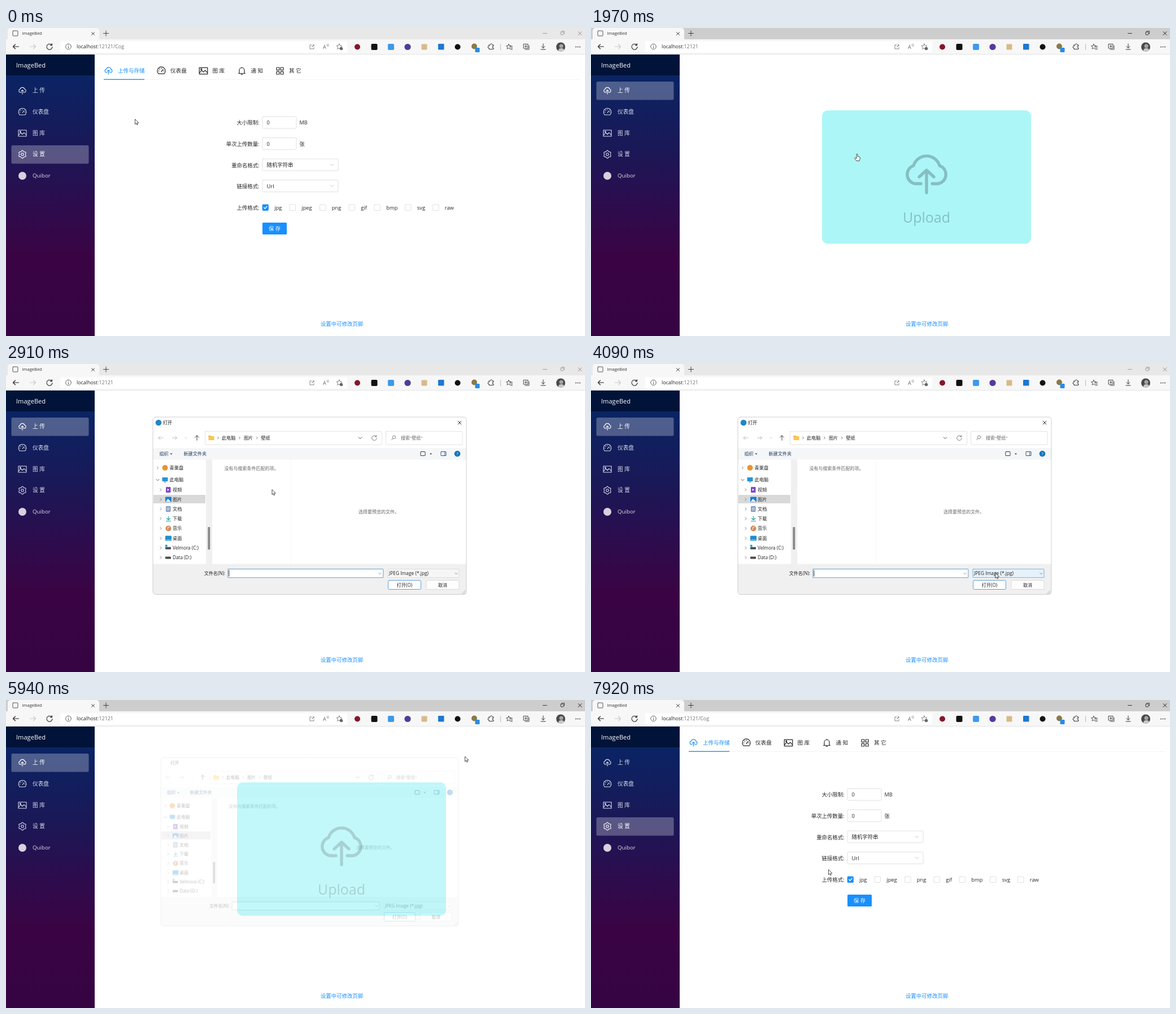
Animation, 1025 px wide and 546 px high, one loop 7990 ms. Source, as an HTML page with a canvas:

```html
<!DOCTYPE html>
<html lang="zh">
<head>
<meta charset="utf-8">
<title>ImageBed</title>
<style>
html, body { margin: 0; width: 100%; height: 100%; overflow: hidden; background: #fff; }
canvas { display: block; width: 1025px; height: 546px; }
</style>
</head>
<body>
<canvas></canvas>
<script>
const W = 1025, H = 546, LOOP = 7990;
const FONT = '"Open Sans", "Noto Sans CJK SC", "Noto Sans CJK", sans-serif';
const BLUE = '#1890ff', INK = '#262626';
const dpr = window.devicePixelRatio || 1;

function setup(canvas) {
  canvas.width = W * dpr;
  canvas.height = H * dpr;
  const ctx = canvas.getContext('2d');
  ctx.scale(dpr, dpr);
  ctx.lineCap = ctx.lineJoin = 'round';
  return ctx;
}
const main = setup(document.querySelector('canvas'));
const layerCanvas = document.createElement('canvas');
const layer = setup(layerCanvas);
let c = main;

// ---- helpers ----
const clamp = v => Math.max(0, Math.min(1, v));
const ramp = (t, from, span) => clamp((t - from) / span);
const smooth = p => p * p * (3 - 2 * p);

function rect(x, y, w, h, fill) {
  c.fillStyle = fill;
  c.fillRect(x, y, w, h);
}
function box(x, y, w, h, r, fill, line, lw = 0.8) {
  c.beginPath();
  c.roundRect(x, y, w, h, r);
  if (fill) { c.fillStyle = fill; c.fill(); }
  if (line) { c.strokeStyle = line; c.lineWidth = lw; c.stroke(); }
}
function disc(x, y, r, fill, line, lw = 1) {
  c.beginPath();
  c.arc(x, y, r, 0, 7);
  if (fill) { c.fillStyle = fill; c.fill(); }
  if (line) { c.strokeStyle = line; c.lineWidth = lw; c.stroke(); }
}
function text(s, x, cy, size, color, align = 'left') {
  c.font = `${size}px ${FONT}`;
  c.textAlign = align;
  c.fillStyle = color;
  c.fillText(s, x, cy + size * 0.36);
}
function icon(d, x, y, line, lw = 1, scale = 1, fill) {
  c.save();
  c.translate(x, y);
  c.scale(scale, scale);
  const p = new Path2D(d);
  if (fill) { c.fillStyle = fill; c.fill(p); }
  if (line) { c.strokeStyle = line; c.lineWidth = lw; c.stroke(p); }
  c.restore();
}

// ---- icon paths, centred on 0,0 ----
const CLOUD = 'M-10 18H-20A16.5 16.5 0 0 1-23-14A24 24 0 0 1 23-14A16.5 16.5 0 0 1 20 18H10M0 34V-5M-13 6L0-6L13 6';
const PICTURE = 'M-7-5.5H7V5.5H-7ZM-7 4L-3-1L0 2L3-1L7 3.5M-4.6-2.8a1 1 0 1 0 2 0a1 1 0 1 0-2 0';
const DASH = 'M-4.6 5A6.8 6.8 0 1 1 4.6 5ZM0 1.2L3.2-2.4M-4.8 0H-3.9M4.8 0H3.9M0-4.8V-3.9M-3.4-3.4L-2.8-2.8';
const BELL = 'M-6 4.5H6M-4.5 4.5V-1A4.5 4.5 0 0 1 4.5-1V4.5M0-5.5V-6.5M-1.5 6.3H1.5';
const GRID = 'M-6-6H-1.3V-1.3H-6ZM1.3-6H6V-1.3H1.3ZM-6 1.3H-1.3V6H-6ZM1.3 1.3H6V6H1.3Z';
const CROSS = 'M-2.6-2.6L2.6 2.6M2.6-2.6L-2.6 2.6';
const DOWN = 'M-2.8-1.3L0 1.5L2.8-1.3';
const RIGHT = 'M-1.2-2.3L1.2 0L-1.2 2.3';
const ARROW_L = 'M5 0H-5M-1-4L-5 0L-1 4';
const ARROW_R = 'M-5 0H5M1-4L5 0L1 4';
const RELOAD = 'M4 -2.8A5 5 0 1 0 5 .6M4.4-5.4V-2.4H1.4';
const STAR = 'M0-5L1.5-1.7L5-1.3L2.4 1L3.1 4.6L0 2.8L-3.1 4.6L-2.4 1L-5-1.3L-1.5-1.7Z';
const TRIANGLE = 'M-2-1H2L0 1.2Z';
const POINTER = 'M0 0V8.6L2 6.8L3.4 9.8L4.7 9.2L3.4 6.3L6 6.1Z';
const HAND = 'M-1 1a1 1 0 0 1 2 0V4.6L4 5.2Q5.3 5.5 5.2 6.8V9L4.2 12.5H-1.2L-4 8.2Q-4.6 7-3.4 6.8L-1 8Z';

function gear(x, y, color) {
  c.beginPath();
  for (let a = 0; a < 6.28; a += 0.1) {
    const r = 6.1 + 0.8 * Math.cos(6 * a);
    c.lineTo(x + r * Math.sin(a), y + r * Math.cos(a));
  }
  c.closePath();
  c.strokeStyle = color;
  c.lineWidth = 1.1;
  c.stroke();
  disc(x, y, 2.2, null, color, 1.1);
}

// ---- cursor ----
const PATH = [
  [0, 228.5, 162], [470, 228.5, 162], [860, 57.5, 105.5], [1330, 57.5, 105.5],
  [1830, 29, 107.5], [1970, 471, 223], [3230, 471, 223], [4020, 716, 371],
  [4760, 716, 371], [5300, 825, 118], [5540, 812.5, 100.5], [6050, 812.5, 100.5],
  [7090, 95.5, 222], [7250, 95.5, 222], [7920, 420.5, 301], [LOOP, 420.5, 301]
];
function cursorAt(t) {
  let i = 1;
  while (PATH[i][0] < t) i++;
  const [t0, x0, y0] = PATH[i - 1], [t1, x1, y1] = PATH[i];
  const p = smooth(ramp(t, t0, t1 - t0));
  return [x0 + (x1 - x0) * p, y0 + (y1 - y0) * p];
}

// ---- browser frame ----
function browser(t) {
  const active = (t >= 70 && t < 2450) || t >= 5840;
  const ctl = active ? '#111' : '#8c8c8c';
  rect(0, 0, W, 21, active ? '#cdcdcd' : '#e8e8e8');
  rect(0, 20, W, 27, '#f7f7f7');
  box(3, 0, 162, 24, [5, 5, 0, 0], '#f7f7f7');
  rect(0, 46, W, 1, '#e2e2e2');

  box(12, 5, 9, 9, 1, null, '#555', 1);
  text('ImageBed', 28.5, 9.5, 7.5, '#333');
  icon(CROSS, 154, 10, '#333', 0.9);
  icon('M-4.5 0H4.5M0-4.5V4.5', 177, 9.5, '#333', 0.9);
  icon('M-3.5 0H3.5', 954, 9.5, ctl, 0.8);
  box(982, 7, 5, 5, 1, null, ctl, 0.8);
  icon('M984 5.5H988.5V10', 0, 0, ctl, 0.7);
  icon(CROSS, 1016, 9.5, ctl, 0.8, 1.15);

  icon(ARROW_L, 17.5, 33, '#222', 1.1);
  icon(ARROW_R, 47.5, 33, '#c8c8c8', 1.1);
  icon(RELOAD, 77, 33, '#222', 1.1);
  box(96, 23.5, 508, 20, 3, '#fff');
  disc(110.5, 33, 4.8, null, '#555', 0.9);
  icon('M0-.5V2.5M0-2.6V-2.4', 110.5, 33, '#555', 0.9);
  text('localhost', 125, 33, 8.9, '#222');
  const port = 125 + c.measureText('localhost').width;
  text(':12121' + (t < 1060 || t >= 7100 ? '/Cog' : ''), port, 33, 8.9, '#707070');

  const g = '#666';
  icon('M-.5-3.5H-3.5V3.5H3.5V1M0 0Q.5-3 4-3M2-5L4-3L2-1', 541.5, 33.5, g, 0.8);
  text('A', 561, 34, 9, g);
  icon('M0-3Q1.5-1.5 0 0M2-4Q4-1.5 2 1', 568, 32, g, 0.7);
  icon(STAR, 590, 33, g, 0.8);
  disc(593.5, 36.5, 2.8, '#666');

  disc(622, 33.5, 5, '#86162b');
  box(646.5, 28, 11, 11, 2, '#111');
  box(676, 28, 11, 11, 2, '#3d9be9');
  disc(711, 33.5, 5.6, '#4f3c9c');
  box(735.5, 28.5, 10, 10, 1, '#d9b98a');
  box(765, 28, 10.5, 10.5, 1, '#1f78d1');
  disc(799.5, 33.5, 5, '#111');
  disc(829, 32.5, 5, '#8a7a48');
  box(830.5, 35, 8, 8, 1, '#2a8be8');

  const k = '#333';
  icon('M-4-3H-1.5a1.6 1.6 0 1 1 3 0H4V-.8a1.5 1.5 0 1 0 0 2.8V4.5H-4V2a1.5 1.5 0 1 1 0-2.8Z', 859, 33, k, 1);
  rect(875, 28, 0.8, 11, '#aaa');
  icon(STAR, 890, 33, k, 0.9, 0.9);
  rect(892, 33, 6, 6, '#f7f7f7');
  icon('M-2-1.6H3M-1 1H3M-1 3.6H3', 893.5, 34, k, 0.9);
  icon('M-5-5H2.5V2.5H-5ZM4.5-2.5V4.5H-2.5M-1.2-3.2V.8M-3.2-1.2H.8', 921.5, 33.5, k, 0.9);
  icon('M0-5V2.5M-3-.5L0 2.5L3-.5M-4 5H4', 951, 33, k, 1);
  c.save();
  c.beginPath();
  c.arc(982, 33.5, 8, 0, 7);
  c.clip();
  rect(974, 25, 16, 17, '#4a484b');
  disc(983, 32, 3.5, '#a9a2a4');
  box(978, 36, 10, 8, 4, '#cac5c7');
  c.restore();
  for (const x of [1009, 1012.5, 1016]) disc(x, 33.5, 0.9, k);
}

// ---- sidebar ----
const MENU = [['上 传', 111], ['仪表盘', 149], ['图 库', 186.5], ['设 置', 224], ['Quibor', 262]];
function sidebar(t, cx, cy) {
  const grad = c.createLinearGradient(0, 84, 0, H);
  [[0, '#0a2464'], [0.3, '#1c1756'], [0.5, '#2d0c4d'], [0.69, '#3a0444'], [1, '#360443']]
    .forEach(([p, col]) => grad.addColorStop(p, col));
  c.fillStyle = grad;
  c.fillRect(0, 47, 157, 499);
  rect(0, 47, 157, 37, '#011338');
  text('ImageBed', 18, 66, 11.1, '#fff');

  const toUpload = ramp(t, 1380, 250) - ramp(t, 7200, 250);
  const selected = [toUpload, 0, 0, 1 - toUpload, 0];
  MENU.forEach(([label, y], i) => {
    const hover = cx > 9 && cx < 147 && Math.abs(cy - y) < 16;
    const a = Math.max(0.27 * selected[i], hover ? 0.12 : 0);
    if (a) box(9.5, y - 16, 137, 32.5, 2.5, `rgba(255,255,255,${a})`);
    const col = hover || selected[i] > 0.5 ? '#fff' : 'rgba(255,255,255,.85)';
    if (i === 0) icon(CLOUD, 29, y, col, 6.2, 0.18);
    if (i === 1) icon(DASH, 29, y, col, 1.1);
    if (i === 2) icon(PICTURE, 29, y, col, 1.1);
    if (i === 3) gear(29, y, col);
    if (i === 4) disc(29, y, 7, '#d6d1de');
    text(label, 47, y, 9.7, col);
  });
}

// ---- pages ----
function settingsPage() {
  rect(173, 91, 843, 0.8, '#efefef');
  rect(173, 90.5, 72, 1.4, BLUE);
  icon(CLOUD, 181.5, 75.7, BLUE, 6.2, 0.185);
  icon(DASH, 275, 76, INK, 1.2, 1.04);
  icon(PICTURE, 349.5, 76, INK, 1.2, 1.04);
  icon(BELL, 417.5, 76, INK, 1.2);
  icon(GRID, 485, 76, INK, 1.2);
  text('上传与存储', 198, 76, 9.5, BLUE);
  [['仪表盘', 291], ['图 库', 365.5], ['通 知', 433.5], ['其 它', 501]]
    .forEach(([s, x]) => text(s, x, 76, 9.6, INK));

  ['大小限制:', '单次上传数量:', '重命名格式:', '链接格式:', '上传格式:']
    .forEach((s, i) => text(s, 448.5, 168 + i * 37.6, 9.4, INK, 'right'));
  [['0', 'MB', 157], ['0', '张', 194.5]].forEach(([v, unit, y]) => {
    box(454, y, 60, 21, 1.5, '#fff', '#d9d9d9');
    text(v, 461.5, y + 11, 9.2, INK);
    text(unit, 519.5, y + 11, 9.2, INK);
  });
  [['随机字符串', 232], ['Url', 269.5]].forEach(([v, y]) => {
    box(454, y, 134, 21, 1.5, '#fff', '#d9d9d9');
    text(v, 461.5, y + 11, 9.4, INK);
    icon(DOWN, 577, y + 10.5, '#bfbfbf', 0.9);
  });
  [['jpg', 454], ['jpeg', 502], ['png', 555.5], ['gif', 607], ['bmp', 652], ['svg', 706.5], ['raw', 755.5]]
    .forEach(([s, x], i) => {
      box(x, 313, 10.5, 10.5, 1.3, i ? '#fff' : BLUE, i ? '#d9d9d9' : BLUE);
      if (!i) icon('M-2.5 0L-.7 2L2.8-2', x + 5.2, 318.2, '#fff', 1.3);
      text(s, x + 21.3, 318.5, 9.3, INK);
    });
  box(454, 345, 43, 21, 1.5, BLUE);
  text('保 存', 475.5, 355.8, 9.4, '#fff', 'center');
}

function uploadPage() {
  box(409, 146, 370, 236.5, 10, '#acf6f8');
  icon(CLOUD, 594, 258, '#86bfc1', 5.3);
  text('Upload', 594, 336, 24.9, '#86bfc1', 'center');
}

function page(t) {
  rect(157, 47, 868, 499, '#fff');
  const upload = t >= 1380 && t < 7200;
  c.globalAlpha = upload ? ramp(t, 1330, 300) : t >= 7200 ? ramp(t, 7150, 300) : 1;
  upload ? uploadPage() : settingsPage();
  c.globalAlpha = 1;
  text('设置中可修改页脚', 594.5, 525, 9.4, BLUE, 'center');
}

// ---- file dialog ----
const TREE = [
  ['青栗盘', 184, '#e8942e'], ['此电脑', 205.5, '#2793d6'], ['视频', 223, '#8048c8'],
  ['图片', 240, '#1680d8'], ['文档', 257, '#8199b8'], ['下载', 274, '#19a39a'],
  ['音乐', 291.5, '#d08a58'], ['桌面', 309, '#1f8ed0'], ['Velmora (C:)', 326, '#4a4a4a'], ['Data (D:)', 343, '#4a4a4a']
];
function treeIcon(i, x, y, col) {
  if (i === 0) disc(x - 8, y, 5, col);
  else if (i === 1) {
    box(x - 13, y - 4.5, 10, 7, 1, col);
    rect(x - 10, y + 3.3, 4, 1, '#567');
  } else if (i === 5) icon('M0-4V2.5M-3-.5L0 2.5L3-.5M-4 4.5H4', x - 7.5, y, col, 1.1);
  else if (i === 6) {
    disc(x - 7.5, y, 5, col);
    icon('M-1 2V-2L2-2.6', x - 7.5, y, '#fff', 1);
  } else if (i > 7) {
    box(x - 13, y - 1.5, 10, 4, 1, col);
    if (i === 8) rect(x - 13, y - 5.5, 3.5, 3.5, '#1d9be0');
  } else {
    const tall = i === 2 || i === 4;
    box(x - (tall ? 12 : 13), y - (tall ? 5 : 4.5), tall ? 8.5 : 11, tall ? 10 : 9, 1, col);
    if (i === 2) icon('M-1.3-2L2 0L-1.3 2Z', x - 8, y, null, 1, 1, '#fff');
    if (i === 3) icon('M-4.5 4L-1-1L4.5 4Z', x - 7.5, y, null, 1, 1, '#fff');
    if (i === 4) icon('M-2.3-2H2.3M-2.3 0H2.3M-2.3 2H2.3', x - 7.8, y, '#fff', 0.8);
    if (i === 7) rect(x - 12, y + 2.5, 9, 1, '#bfe4f7');
  }
}

function dialogBody(t) {
  const grey = '#666', dark = '#222', navy = '#1e395b';
  text('此电脑', 382, 131, 8.1, dark);
  text('图片', 421, 131, 8.1, dark);
  text('壁纸', 451.5, 131, 8.1, dark);
  for (const x of [375.5, 413.5, 444.5]) icon(RIGHT, x, 131, dark, 0.8, 0.8);
  icon(ARROW_L, 274, 131, '#999', 0.8, 0.8);
  icon(ARROW_R, 298.5, 131, '#999', 0.8, 0.8);
  icon(DOWN, 318.5, 131, '#999', 0.8, 0.6);
  icon('M0 5V-5M-4-1L0-5L4-1', 338, 131, dark, 1, 0.85);
  box(358.5, 127, 4.5, 3, 0.8, '#e3a42f');
  box(358.5, 128, 10, 7, 0.8, '#f9c64e');
  icon(DOWN, 627, 131, dark, 0.8);
  icon(RELOAD, 652, 131, '#555', 0.9, 0.85);
  disc(687, 129.8, 2.7, null, grey, 0.8);
  icon('M685 132L682.5 134.5', 0, 0, grey, 0.8);
  text('搜索"壁纸"', 699, 131, 8, grey);

  text('组织', 271.5, 159.5, 8, navy);
  icon(TRIANGLE, 292.5, 159.5, null, 1, 1, navy);
  text('新建文件夹', 314.5, 159.5, 8.1, navy);
  box(734, 155.5, 8, 7, 0.5, '#fff', '#333', 1);
  icon(TRIANGLE, 752, 159.5, null, 1, 1, '#333');
  box(770, 155.5, 9, 7, 0.5, '#fff', '#335', 0.9);
  rect(775.5, 156, 3, 6, '#8cb8e0');
  disc(799, 159, 5.3, '#0f74bd');
  text('?', 799, 159, 7.5, '#fff', 'center');

  rect(261, 232, 92, 15, '#d9d9d9');
  TREE.forEach(([s, y, col], i) => {
    const x = i < 2 ? 289.5 : 295;
    icon(i === 1 ? DOWN : RIGHT, i < 2 ? 268.5 : 274, y, i === 1 ? dark : '#777', 0.8, i === 1 ? 0.9 : 1);
    treeIcon(i, x, y, col);
    text(s, x, y, 8.2, dark);
  });
  text('没有与搜索条件匹配的项。', 386.5, 185.5, 8, grey);
  text('选择要预览的文件。', 624, 262.5, 8, grey);

  const focused = t < 4580;
  text('文件名(N):', 388, 371, 8.1, dark, 'right');
  box(392.8, 363.5, 275, 15.2, 0.5, '#fff', focused ? '#3c8cc8' : '#9a9a9a', 0.8);
  if (focused && Math.floor((t - 2790) / 530) % 2 === 0) rect(394.3, 365.5, 0.9, 11, '#111');
  icon(DOWN, 662, 371.5, '#555', 0.8, 0.8);
  const hover = t >= 3930 && t < 4880;
  box(676, 363.5, 126, 15, 0.5, hover ? '#e5f1fb' : '#f6f6f6', hover ? '#5fa5da' : '#dadada', 0.8);
  text('JPEG Image (*.jpg)', 678, 371, 8.4, dark);
  icon(DOWN, 797, 371.5, '#555', 0.8, 0.8);
  box(676.5, 383.5, 58, 16, 2, '#fdfdfd', '#3c8cc8', 0.8);
  box(744, 383.5, 58, 16, 2, '#fdfdfd', '#d4d4d4', 0.8);
  text('打开(O)', 705.5, 391.8, 8.1, dark, 'center');
  text('取消', 773, 391.8, 8.1, dark, 'center');
  for (let i = 0; i < 3; i++)
    for (let j = 0; j <= i; j++) rect(807 + i * 2.3, 406 - j * 2.3, 1.2, 1.2, '#aaa');
}

function dialogWindow(t) {
  const loaded = t >= 2690, closing = t >= 5840;
  box(260, 94, 555, 314.5, 5, '#fff');
  c.save();
  c.clip();
  rect(260, 149, 555, 20.5, loaded ? '#f5f6f8' : '#fff');
  rect(354, 169.5, 11, 185, '#f0f0f0');
  rect(504, 169.5, 0.8, 185, '#f7f7f7');
  rect(260, 354.5, 555, 55, '#f0f0f0');
  const top = loaded ? 289 : 181;
  box(357.3, top, 4, loaded ? 40 : 50, 1, '#8a8a8a');
  text('打开', 278, 104, 8.1, '#111');
  if (!closing) {
    disc(270, 104, 5.3, '#1f86c6');
    const hot = t >= 5440;
    if (hot) rect(791, 94, 24, 18, '#c42b1c');
    icon(CROSS, 803, 104, hot ? '#fff' : '#222', 0.9, 1.1);
  }
  if (loaded) {
    box(352.5, 119.5, 313, 23.5, 0.5, '#fff', '#dedede');
    box(672.5, 119.5, 135.5, 23.5, 0.5, '#fff', '#dedede');
    dialogBody(t);
  } else {
    rect(352, 363, 316, 16, '#fff');
    rect(676, 363, 126, 16, '#fff');
    rect(676, 383, 59, 17, '#fff');
    rect(744, 383, 58, 17, '#fff');
  }
  c.restore();
  box(260, 94, 555, 314.5, 5, null, '#c2c2c2', 0.8);
}

function dialog(t) {
  if (t < 2610 || t > 5980) return;
  const open = ramp(t, 2610, 300), close = ramp(t, 5840, 140);
  const scale = 0.85 + 0.15 * (1 - (1 - open) ** 2) - 0.07 * close;
  c = layer;
  c.clearRect(0, 0, W, H);
  dialogWindow(t);
  c = main;
  c.save();
  c.globalAlpha = ramp(t, 2610, 150) * (1 - close);
  c.translate(537.5, 251.3);
  c.scale(scale, scale);
  c.drawImage(layerCanvas, -537.5, -251.3, W, H);
  c.restore();
}

function cursor(t, x, y) {
  const onMenu = x > 9 && x < 147 && MENU.some(m => Math.abs(y - m[1]) < 16);
  const onUpload = t > 1900 && t < 2570 && x > 409;
  // the arrow fades in while the dialog takes over the pointer
  const line = t > 2570 && t < 2700 ? '#9aa' : '#222';
  icon(onMenu || onUpload ? HAND : POINTER, x, y, line, 0.8, 1, '#fff');
}

function draw(t) {
  const [x, y] = cursorAt(t);
  c.clearRect(0, 0, W, H);
  browser(t);
  page(t);
  sidebar(t, x, y);
  dialog(t);
  cursor(t, x, y);
}

const start = performance.now();
function tick() {
  draw((performance.now() - start) % LOOP);
  requestAnimationFrame(tick);
}
tick();
</script>
</body>
</html>
```
